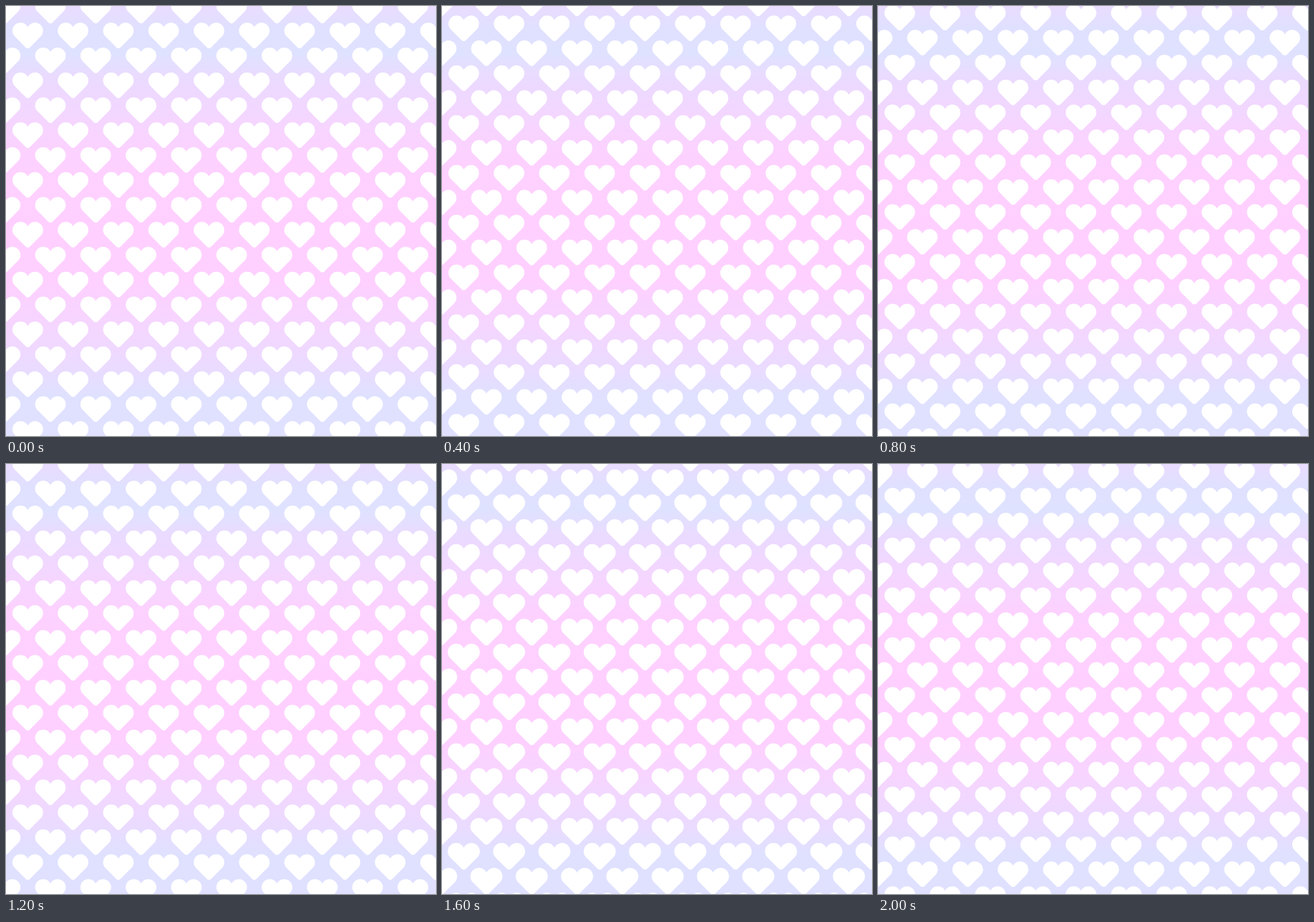
These frames come from a looping animation (600x600 px, 2.2 s). An HTML page with a canvas:

```html
<!DOCTYPE html>
<html lang="en">
<head>
<meta charset="utf-8">
<title>Drifting hearts</title>
<style>
  html, body { margin: 0; width: 100%; height: 100%; overflow: hidden; }
  canvas { display: block; width: 100%; height: 100%; }
</style>
</head>
<body>
<canvas id="stage" width="600" height="600"></canvas>
<script>
const ctx = document.getElementById("stage").getContext("2d");
const SIZE = 600;
const COL = 63.22, ROW = 69.5;
const LEFT = 30.4, TOP = 40.9;
const HOLD = 200, COUNT = 11, STEPS = 14;

const sky = ctx.createLinearGradient(0, 0, 0, SIZE);
[
  [0, "#eadcff"], [0.05, "#e0e0ff"], [0.11, "#dfe2ff"], [0.17, "#ebdaff"],
  [0.26, "#f4d6ff"], [0.35, "#fdd1ff"], [0.5, "#ffd0ff"], [0.64, "#fed0ff"],
  [0.73, "#f6d5ff"], [0.83, "#ecdaff"], [0.91, "#dfe1ff"], [1, "#e0e1ff"]
].forEach(([at, color]) => sky.addColorStop(at, color));

// Two round lobes joined by 45 degree sides with a softened tip.
function makeHeart() {
  const r = 11.3, cx = 10.1, cy = -6.3;
  const notch = Math.acos(cx / r);
  const tip = cy + cx + r * Math.SQRT2;
  const p = new Path2D();
  p.arc(cx, cy, r, Math.PI + notch, Math.PI * 2.25);
  p.arcTo(0, tip, -cx, tip - cx, 4.2);
  p.arc(-cx, cy, r, Math.PI * 0.75, Math.PI * 2 - notch);
  p.closePath();
  return p;
}
const heart = makeHeart();

function draw(step) {
  const rise = step * ROW / STEPS;
  const scale = step >= 8 && step <= 11 ? 1.045 : 1;
  ctx.fillStyle = sky;
  ctx.fillRect(0, 0, SIZE, SIZE);
  ctx.fillStyle = "#fff";
  for (let row = -2; row < 20; row++) {
    const shift = row & 1 ? COL / 2 : 0;
    for (let col = -1; col < 10; col++) {
      ctx.save();
      ctx.translate(LEFT + shift + col * COL, TOP + row * ROW / 2 - rise);
      ctx.scale(scale, scale);
      ctx.fill(heart);
      ctx.restore();
    }
  }
}

function tick() {
  const k = Math.floor(performance.now() / HOLD) % COUNT;
  // The drift skips one step in every five.
  draw(k + Math.floor((k + 1) / 4));
  requestAnimationFrame(tick);
}
tick();
</script>
</body>
</html>
```
